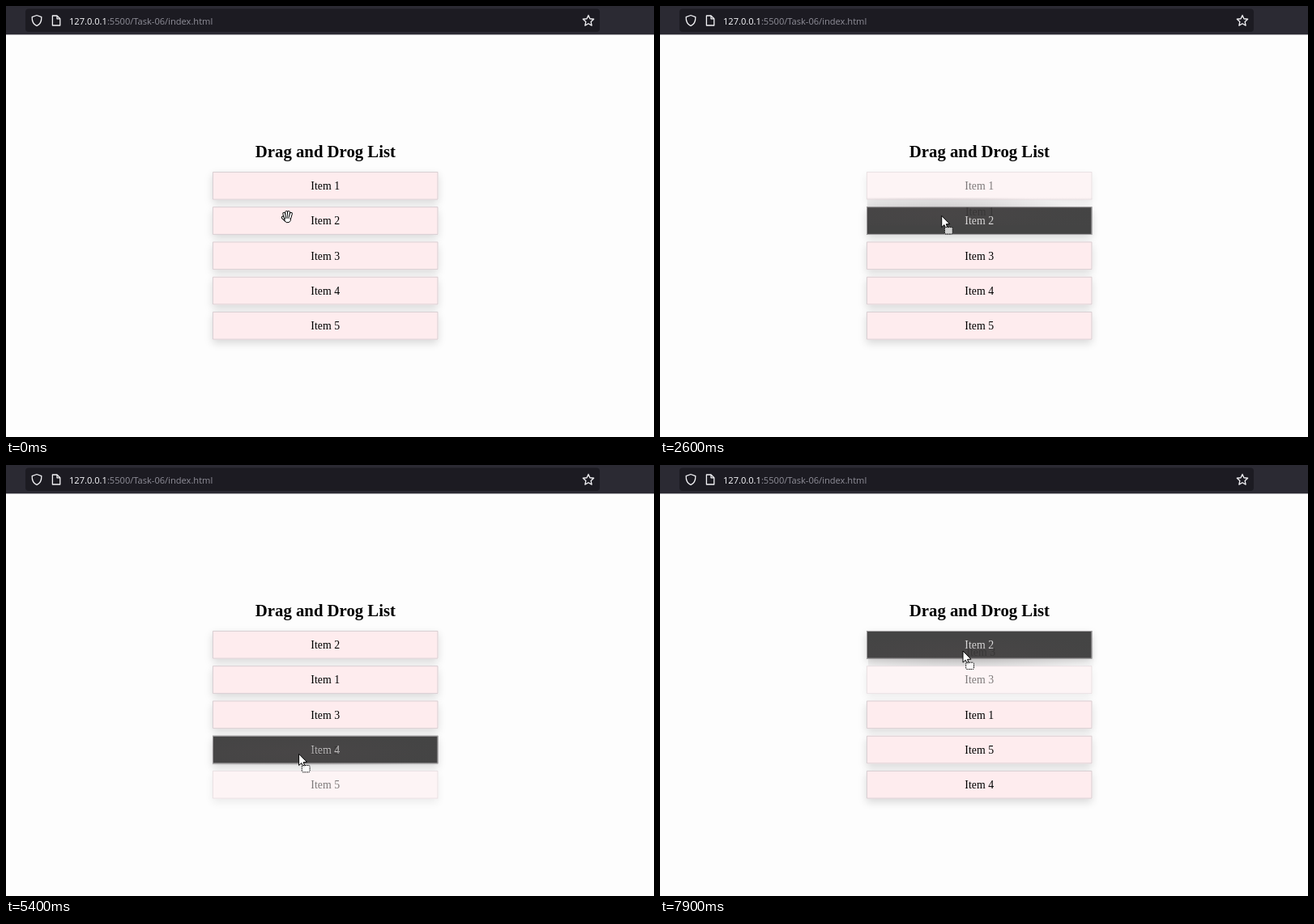
These frames come from a looping animation (800x533 px, 8000 ms). An HTML page with a canvas:

```html
<!DOCTYPE html>
<html lang="en">
<head>
<meta charset="utf-8">
<title>Drag and drop list</title>
<style>
html, body { margin: 0; width: 100%; height: 100%; overflow: hidden; background: #fdfdfd; }
canvas { display: block; width: 800px; height: 533px; }
</style>
</head>
<body>
<canvas id="stage"></canvas>
<script>
const LOOP = 8000, STEP = 100;
const BG = '#fdfdfd';
const LEFT = 255, TOP = 205, W = 278.4, H = 34.6, PITCH = 43.25;
const MID = LEFT + W / 2;
const SERIF = '"Liberation Serif", "Times New Roman", serif';
const ITEM_FONT = '13.84px ' + SERIF;

const canvas = document.getElementById('stage');
const ctx = canvas.getContext('2d');
const ratio = window.devicePixelRatio || 1;
canvas.width = 800 * ratio;
canvas.height = 533 * ratio;

// Pointer key points; pow > 1 eases out on the way there
const keys = [
  { t: 0, x: 347, y: 261 },
  { t: 1500, x: 347, y: 227.5, pow: 2 },
  { t: 3000, x: 348, y: 271 },
  { t: 4000, x: 360, y: 369 },
  { t: 4700, x: 362, y: 399, pow: 2 },
  { t: 6000, x: 361.5, y: 346, pow: 2 },
  { t: 7300, x: 372, y: 307.5 },
  { t: 7900, x: 374, y: 230 }
];

const drags = [
  { row: 0, dir: 1, from: 1500, to: 3100 },
  { row: 4, dir: -1, from: 4700, to: 6200 },
  { row: 2, dir: -1, from: 7300, to: LOOP }
];

const rowY = i => TOP + i * PITCH;

function pointerAt(t) {
  const i = Math.max(1, keys.findIndex(k => k.t >= t));
  const a = keys[i - 1], b = keys[i];
  const k = 1 - Math.pow(1 - (t - a.t) / (b.t - a.t), b.pow || 1);
  return { x: a.x + (b.x - a.x) * k, y: a.y + (b.y - a.y) * k };
}

// The held item takes over each row whose middle the pointer has passed
function heldRow({ row, dir }, y) {
  const pos = (y - TOP - H / 2) / PITCH;
  return dir > 0 ? Math.max(row, Math.floor(pos)) : Math.min(row, Math.ceil(pos));
}

function listAt(t) {
  const order = [1, 2, 3, 4, 5];
  const list = { order, drag: null, held: -1 };
  for (const d of drags) {
    if (t < d.from) break;
    const { y } = pointerAt(Math.min(t, d.to));
    const row = heldRow(d, y);
    order.splice(row, 0, order.splice(d.row, 1)[0]);
    if (t < d.to) Object.assign(list, { drag: d, held: row });
  }
  return list;
}

function text(str, x, y, font, color, align = 'center') {
  ctx.font = font;
  ctx.fillStyle = color;
  ctx.textAlign = align;
  ctx.fillText(str, x, y);
}

function trace(points, close = true) {
  ctx.beginPath();
  points.forEach(([x, y]) => ctx.lineTo(x, y));
  if (close) ctx.closePath();
}

function at(x, y, draw) {
  ctx.save();
  ctx.translate(x, y);
  draw();
  ctx.restore();
}

function drawToolbar() {
  ctx.fillStyle = '#2b2a33';
  ctx.fillRect(0, 0, 800, 35.4);
  ctx.fillStyle = '#1c1b22';
  ctx.beginPath();
  ctx.roundRect(24, 3.5, 709, 28.5, 4);
  ctx.fill();

  const font = '11.1px "Open Sans", "Noto Sans", sans-serif';
  text('127.0.0.1', 78, 23, font, '#fbfbfe', 'left');
  const host = ctx.measureText('127.0.0.1').width;
  text(':5500/Task-06/index.html', 78 + host, 23, font, '#908f99', 'left');

  ctx.strokeStyle = '#f2f2f5';
  ctx.lineWidth = 1.3;
  ctx.lineJoin = 'round';
  at(38, 18, () => {
    ctx.beginPath();
    ctx.moveTo(0, -6.5);
    for (const side of [1, -1]) {
      ctx.moveTo(0, -6.5);
      ctx.lineTo(5.8 * side, -4.3);
      ctx.bezierCurveTo(6 * side, 1, 4 * side, 4.8, 0, 6.6);
    }
    ctx.stroke();
  });
  at(62, 18, () => {
    trace([[-4.6, -6], [1, -6], [4.8, -2.2], [4.8, 6], [-4.6, 6]]);
    ctx.stroke();
    trace([[1, -6], [1, -2.2], [4.8, -2.2]], false);
    ctx.stroke();
  });
  at(719, 18.4, () => {
    trace(Array.from({ length: 10 }, (_, i) => {
      const r = i % 2 ? 3.3 : 7, a = i * Math.PI / 5;
      return [r * Math.sin(a), -r * Math.cos(a)];
    }));
    ctx.stroke();
  });
}

function drawRow(item, y, alpha, dark) {
  ctx.save();
  ctx.globalAlpha = alpha;
  ctx.shadowColor = 'rgba(0,0,0,0.15)';
  ctx.shadowBlur = 10 * ratio;
  ctx.shadowOffsetY = 4.3 * ratio;
  ctx.fillStyle = BG;
  ctx.fillRect(LEFT, y, W, H);
  ctx.shadowColor = 'transparent';
  ctx.globalAlpha = 1;
  ctx.fillRect(LEFT, y, W, H);
  ctx.globalAlpha = alpha;
  ctx.fillStyle = dark ? '#444' : '#feecee';
  ctx.fillRect(LEFT, y, W, H);
  ctx.strokeStyle = dark ? '#b8b6b8' : '#d3cbcf';
  ctx.lineWidth = 0.9;
  ctx.strokeRect(LEFT + 0.45, y + 0.45, W - 0.9, H - 0.9);
  text('Item ' + item, MID, Math.round(y + 22), ITEM_FONT, dark ? '#f0f0f0' : '#000');
  ctx.restore();
}

// Translucent copy under the pointer, densest around it
function drawGhost(item, drag, p) {
  const grab = pointerAt(drag.from);
  const x = LEFT + p.x - grab.x, y = rowY(drag.row) + p.y - grab.y;
  ctx.save();
  ctx.beginPath();
  ctx.rect(x, y, W, H);
  ctx.clip();
  at(p.x - 4, y + H / 2 + 2, () => {
    ctx.scale(1, 0.13);
    const g = ctx.createRadialGradient(0, 0, 0, 0, 0, 180);
    g.addColorStop(0, 'rgba(82,74,76,0.3)');
    g.addColorStop(0.5, 'rgba(82,74,76,0.16)');
    g.addColorStop(1, 'rgba(82,74,76,0.02)');
    ctx.fillStyle = g;
    ctx.fillRect(-300, -300, 600, 600);
  });
  text('Item ' + item, x + W / 2, y + 22, ITEM_FONT, 'rgba(0,0,0,0.22)');
  ctx.restore();
}

function drawHand(p) {
  const finger = (x0, y0, x1, y1) => {
    for (const [width, color] of [[3.8, '#000'], [1.9, '#fff']]) {
      trace([[x0, y0], [x1, y1]], false);
      ctx.lineWidth = width;
      ctx.strokeStyle = color;
      ctx.stroke();
    }
  };
  at(p.x, p.y, () => {
    ctx.lineCap = 'round';
    finger(-1.5, 4, -5.3, 0.6);
    for (let i = 0; i < 4; i++) {
      const s = i - 1.5;
      finger(0.6 + 1.7 * s, 2, 0.6 + 2.9 * s, -6.2 + 0.9 * s * s);
    }
    ctx.beginPath();
    ctx.ellipse(0.6, 3.2, 3.7, 3.6, 0, -0.4, Math.PI + 0.4);
    ctx.fillStyle = '#fff';
    ctx.fill();
    ctx.lineWidth = 1;
    ctx.strokeStyle = '#000';
    ctx.stroke();
  });
}

function drawArrow(p) {
  at(p.x, p.y, () => {
    ctx.fillStyle = '#fff';
    ctx.strokeStyle = '#000';
    ctx.lineWidth = 1;
    trace([
      [0, 0], [0, 14.2], [3.2, 11.2], [5.4, 16.2], [7.6, 15.2],
      [5.5, 10.4], [10, 10.2]
    ]);
    ctx.fill();
    ctx.stroke();
    ctx.beginPath();
    ctx.roundRect(3.7, 14.2, 9.8, 8.4, 1.5);
    ctx.fillStyle = 'rgba(255,255,255,0.75)';
    ctx.fill();
    ctx.setLineDash([1.6, 0.9]);
    ctx.stroke();
  });
}

function draw(t) {
  ctx.setTransform(ratio, 0, 0, ratio, 0, 0);
  ctx.fillStyle = BG;
  ctx.fillRect(0, 0, 800, 533);
  drawToolbar();
  text('Drag and Drog List', MID + 0.2, 187, 'bold 20.76px ' + SERIF, '#000');

  const p = pointerAt(t);
  const { order, drag, held } = listAt(t);
  order.forEach((item, i) => {
    const y = rowY(i);
    const over = drag && i !== held && p.y >= y && p.y <= y + H;
    drawRow(item, y, i === held ? 0.5 : 1, over);
  });
  if (drag) {
    drawGhost(order[held], drag, p);
    drawArrow(p);
  } else {
    drawHand(p);
  }
}

const start = performance.now();
function tick() {
  const t = (performance.now() - start) % LOOP;
  draw(Math.floor(t / STEP) * STEP);
  requestAnimationFrame(tick);
}
tick();
</script>
</body>
</html>
```
